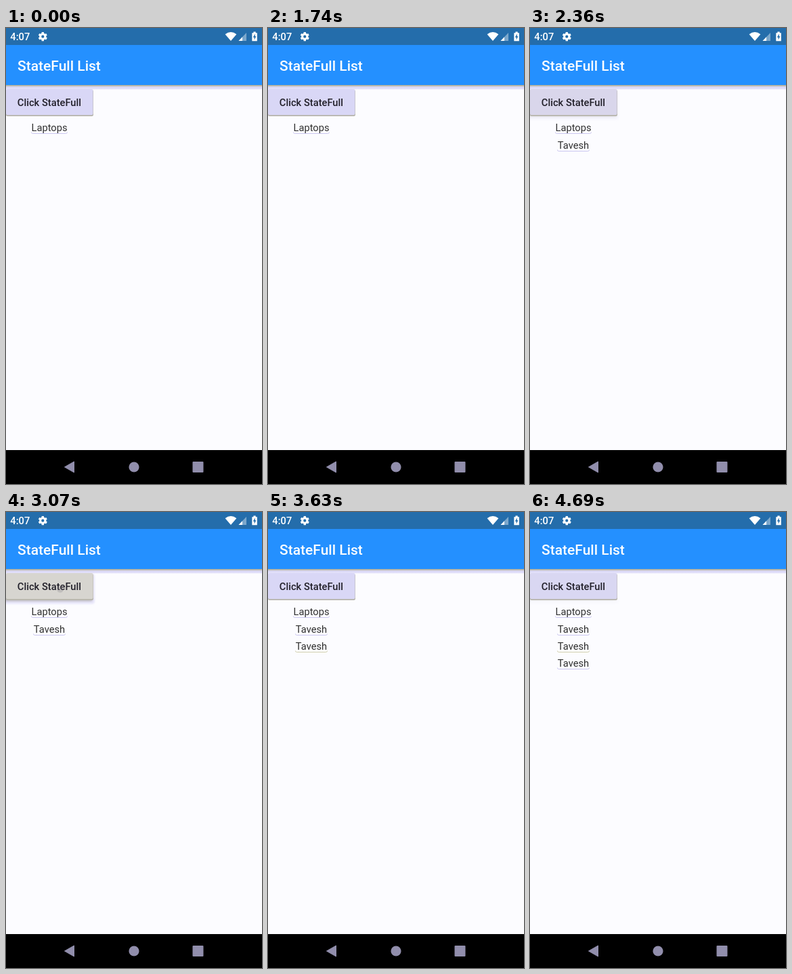
These frames come from a looping animation (378x672 px, 6120 ms). An HTML page:

```html
<!DOCTYPE html>
<html lang="en">
<head>
<meta charset="utf-8">
<style>
html, body { margin: 0; width: 100%; height: 100%; overflow: hidden; background: #fcfcff; }
svg { display: block; width: 378px; height: 672px; font: 14.7px Roboto, sans-serif; }
.medium { font-weight: 500; }
.row { text-anchor: middle; fill: #303030; }
</style>
</head>
<body>
<svg viewBox="0 0 378 672">
  <defs>
    <linearGradient id="barShade" x2="0" y2="1">
      <stop stop-color="#a9a891"/>
      <stop offset=".28" stop-color="#cbc8c5"/>
      <stop offset=".4" stop-color="#d8d6f6"/>
      <stop offset=".8" stop-color="#e3e1fb"/>
      <stop offset="1" stop-color="#fcfcff"/>
    </linearGradient>
    <filter id="soft" x="-10%" y="-30%" width="120%" height="160%"><feGaussianBlur stdDeviation="1.2"/></filter>
  </defs>
  <rect width="378" height="672" fill="#fcfcff"/>
  <rect y="84" width="378" height="7" fill="url(#barShade)"/>

  <!-- button -->
  <rect id="glow" x="-4" y="91" width="135" height="44.5" rx="4" fill="#d5d2f6" filter="url(#soft)"/>
  <rect id="lift" x="-2" y="94" width="130" height="38" rx="3" fill="#a5a39f" filter="url(#soft)"/>
  <rect x="0" y="91" width="129" height="39" rx="2.5" fill="#b6b4aa"/>
  <rect id="face" y="90" width="128.5" height="38.3" rx="2.2"/>
  <text class="medium" x="16.8" y="114.5" fill="#22202a">Click StateFull</text>
  <circle id="touch" cx="80" cy="114" fill="#77747c"/>

  <g id="rows"></g>

  <!-- status and title bars -->
  <rect width="378" height="25.2" fill="#246dab"/>
  <rect y="25" width="378" height="59" fill="#2490ff"/>
  <text class="medium" x="17" y="63" font-size="21" fill="#fff">StateFull List</text>
  <g fill="#fff">
    <text class="medium" x="6.3" y="18">4:07</text>
    <g transform="translate(54.3 12.7)">
      <circle r="3.6" fill="none" stroke="#fff" stroke-width="3"/>
      <g id="teeth"></g>
    </g>
    <path d="M323.6 9.2Q332 3 340.4 9.2L332 19Z"/>
    <path d="M343.5 19L355 7V19Z" opacity=".4"/>
    <path d="M343.5 19L349 13.2V19Z"/>
    <path d="M363.3 7.2H365.4V5.6H368.7V7.2H370.8V19.2H363.3Z"/>
    <path d="M367.7 8.5L364.8 13.8H366.6V17.6L369.4 12.3H367.7Z" fill="#246dab"/>
  </g>

  <!-- navigation bar -->
  <rect y="622" width="378" height="50" fill="#000"/>
  <g fill="#918eac">
    <path d="M86.5 647L100.5 639V655Z" stroke="#918eac" stroke-linejoin="round"/>
    <circle cx="189" cy="647" r="7.6"/>
    <rect x="275.5" y="639" width="16" height="16" rx="1"/>
  </g>
</svg>
<script>
const LOOP = 6120;
const clicks = [
  { down: 2090, full: 2220, up: 2310, rest: 2370, add: 2320 },
  { down: 2940, full: 3190, up: 3290, rest: 3600, add: 3300 },
  { down: 4250, full: 4490, up: 4520, rest: 4700, add: 4520 }
];
const get = id => document.getElementById(id);
const clamp = v => Math.max(0, Math.min(1, v));
const mix = (a, b, p) => `rgb(${a.map((v, i) => Math.round(v + (b[i] - v) * p))})`;

get('teeth').innerHTML = Array.from({ length: 6 }, (_, i) =>
  `<rect x="-1.7" y="-6.6" width="3.4" height="3" rx=".5" transform="rotate(${i * 60})"/>`).join('');

function makeRow(label, i, half) {
  const y = 152.4 + 25.2 * i, line = Math.round(y + 3) + .5;
  const color = i === 2 ? '#d2d0ae' : '#cbc7f0';
  return `<g><path d="M${64 - half} ${line - 2}q0 2 2 2H${62 + half}q2 0 2 -2" fill="none" stroke="${color}"/>
    <text class="row" x="64" y="${y}">${label}</text></g>`;
}
get('rows').innerHTML = makeRow('Laptops', 0, 26.5) +
  clicks.map((_, i) => makeRow('Tavesh', i + 1, 23.5)).join('');
const rows = [...get('rows').children].slice(1);

function draw(t) {
  const press = Math.max(...clicks.map(c =>
    Math.min(clamp((t - c.down) / (c.full - c.down)), clamp((c.rest - t) / (c.rest - c.up)))));
  get('face').setAttribute('fill', mix([217, 215, 246], [214, 211, 174], press));
  get('glow').setAttribute('opacity', press);
  get('lift').setAttribute('opacity', press * .9);
  get('touch').setAttribute('r', 9 * Math.sqrt(press) * clamp(press * 1.4));
  get('touch').setAttribute('opacity', press * .45);
  rows.forEach((row, i) => row.setAttribute('visibility', t >= clicks[i].add ? 'visible' : 'hidden'));
}

const start = performance.now();
function tick() {
  draw((performance.now() - start) % LOOP);
  requestAnimationFrame(tick);
}
tick();
</script>
</body>
</html>
```
